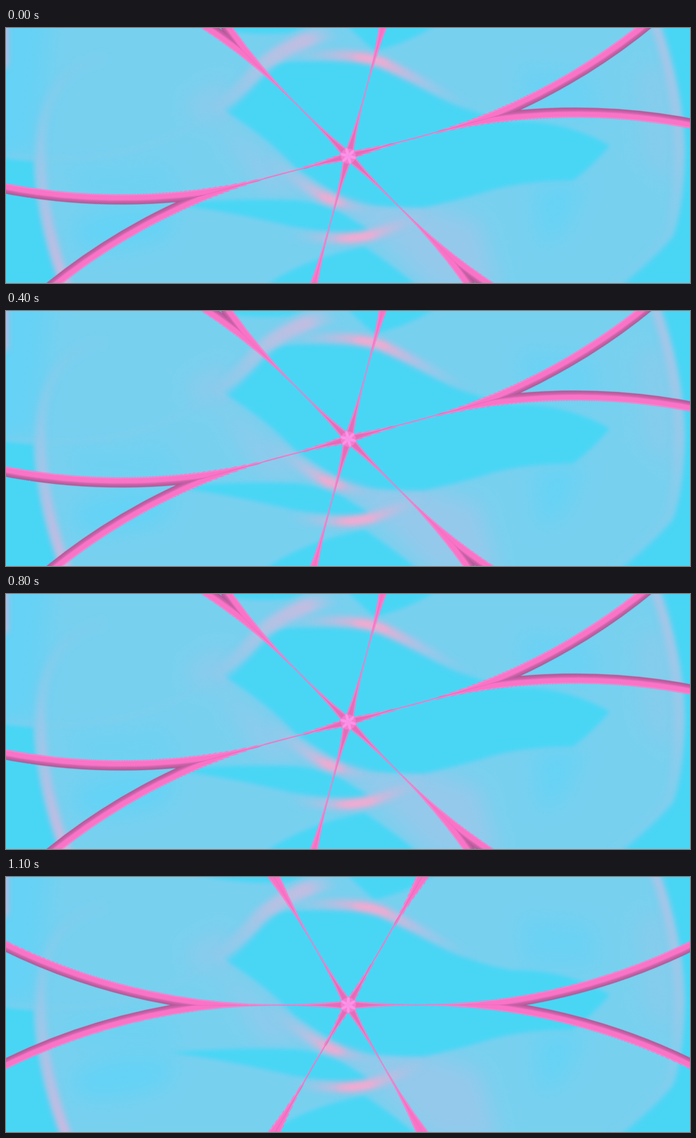
An HTML page without scripts for the animation above (1.2 s loop, 1040 px wide and 388 px high).

```html
<!DOCTYPE html>
<html lang="en">
<head>
<meta charset="utf-8">
<title>Turning star</title>
<style>
  html, body { margin: 0; width: 100%; height: 100%; overflow: hidden; background: #4ad6f5; }
  svg { display: block; width: 100vw; height: 100vh; }
  .spin { transform-origin: 0 0; animation: spin 400ms steps(4, end) infinite; }
  @keyframes spin {
    from { transform: rotate(-15deg); }
    to { transform: rotate(-75deg); }
  }
  .line { fill: none; }
  .cyan { fill: #4ad6f5; }
</style>
</head>
<body>
<svg viewBox="0 0 1040 388" preserveAspectRatio="none">
  <defs>
    <filter id="soft2" filterUnits="userSpaceOnUse" x="-60" y="-60" width="1160" height="510"><feGaussianBlur stdDeviation="3"/></filter>
    <filter id="soft5" filterUnits="userSpaceOnUse" x="-60" y="-60" width="1160" height="510"><feGaussianBlur stdDeviation="5"/></filter>
    <filter id="soft16" filterUnits="userSpaceOnUse" x="-60" y="-60" width="1160" height="510"><feGaussianBlur stdDeviation="16"/></filter>

    <linearGradient id="arcA" gradientUnits="userSpaceOnUse" x1="325" y1="125" x2="500" y2="2">
      <stop offset="0" stop-color="#94c9eb" stop-opacity=".5"/>
      <stop offset=".5" stop-color="#b2c2e4"/>
      <stop offset=".8" stop-color="#c2bde1"/>
      <stop offset="1" stop-color="#b8c2e4" stop-opacity="0"/>
    </linearGradient>
    <linearGradient id="arcB" gradientUnits="userSpaceOnUse" x1="425" y1="0" x2="710" y2="0">
      <stop offset="0" stop-color="#a8c6e8" stop-opacity="0"/>
      <stop offset=".42" stop-color="#f4a9d0"/>
      <stop offset=".55" stop-color="#e2b0d6"/>
      <stop offset=".75" stop-color="#a8c4e8" stop-opacity=".8"/>
      <stop offset="1" stop-color="#8ccbec" stop-opacity="0"/>
    </linearGradient>
    <linearGradient id="arcC" gradientUnits="userSpaceOnUse" x1="395" y1="0" x2="560" y2="0">
      <stop offset="0" stop-color="#98c8ea" stop-opacity="0"/>
      <stop offset=".4" stop-color="#b8c0e2"/>
      <stop offset=".6" stop-color="#f2a9d0"/>
      <stop offset="1" stop-color="#a0c8ea" stop-opacity="0"/>
    </linearGradient>
    <linearGradient id="arcD" gradientUnits="userSpaceOnUse" x1="430" y1="0" x2="640" y2="0">
      <stop offset="0" stop-color="#a0c8ea" stop-opacity="0"/>
      <stop offset=".45" stop-color="#f6a9d0"/>
      <stop offset=".6" stop-color="#eaaed4"/>
      <stop offset="1" stop-color="#a0c8ea" stop-opacity="0"/>
    </linearGradient>
    <linearGradient id="rimL" x1="0" y1="0" x2="0" y2="1">
      <stop offset="0" stop-color="#86ccec" stop-opacity=".2"/>
      <stop offset=".45" stop-color="#9ac8ea"/>
      <stop offset="1" stop-color="#d2b6de"/>
    </linearGradient>
    <linearGradient id="rimR" x1="0" y1="0" x2="0" y2="1">
      <stop offset="0" stop-color="#acc4e6"/>
      <stop offset=".5" stop-color="#98c9ea"/>
      <stop offset="1" stop-color="#7ccfef" stop-opacity=".3"/>
    </linearGradient>
    <linearGradient id="pink" gradientUnits="userSpaceOnUse" x1="0" y1="0" x2="120" y2="0">
      <stop offset=".1" stop-color="#e66cb9"/>
      <stop offset="1" stop-color="#f973c6"/>
    </linearGradient>

    <!-- half of one arm: a ring nearly touching the x axis -->
    <path id="edge" d="M0-6.3A940 940 0 0 0 585-132.2"/>
    <clipPath id="half"><path d="M0-6.3A940 940 0 0 0 585-132.2V.4H0Z"/></clipPath>
    <g id="branch" clip-path="url(#half)" class="line">
      <use href="#edge" stroke="#b35a97" stroke-width="30"/>
      <use href="#edge" stroke="#c460a5" stroke-width="26"/>
      <use href="#edge" stroke="#da68b3" stroke-width="21"/>
      <use href="#edge" stroke="url(#pink)" stroke-width="17.5"/>
      <use href="#edge" stroke="#ff86d3" stroke-width="2.4"/>
    </g>
    <g id="arm">
      <use href="#branch"/>
      <use href="#branch" transform="scale(1 -1)"/>
    </g>
    <g id="trio">
      <use href="#arm"/>
      <use href="#arm" transform="rotate(60)"/>
      <use href="#arm" transform="rotate(120)"/>
    </g>
    <g id="petals" fill="#fb93e6">
      <ellipse cx="6.5" rx="6" ry="2.3"/>
      <ellipse cx="6.5" rx="6" ry="2.3" transform="rotate(60)"/>
      <ellipse cx="6.5" rx="6" ry="2.3" transform="rotate(120)"/>
    </g>
  </defs>

  <rect width="1040" height="388" fill="#78d0ef"/>

  <!-- broad tints -->
  <g filter="url(#soft16)">
    <path d="M-40-40H70L50 190L-40 200Z" fill="#66d2f5"/>
    <path d="M100 300Q170 260 260 280L240 320Q160 345 110 335Z" fill="#64d3f6"/>
    <path d="M90 205Q180 215 240 200L270 260H110Z" fill="#6ed1f2"/>
    <path d="M780 60L890 70L900 135H790Z" fill="#6bd2f4"/>
    <path d="M805 240L880 235L850 310L810 330Z" fill="#66d3f5"/>
    <path d="M275 110L330 80L350 130L290 145Z" fill="#8ccbec"/>
    <path d="M320 140L470 250L390 250Z" fill="#90caec"/>
    <path d="M500 262H620L720 295L750 400H650L570 320Z" fill="#94c9eb"/>
    <path d="M960 60L1010 60L1020 240L970 200Z" fill="#86ccec"/>
  </g>

  <!-- clear openings -->
  <g class="cyan" filter="url(#soft2)">
    <path d="M398 54Q470 48 530 51Q580 58 640 94Q700 130 770 142Q850 140 918 179Q890 212 862 232Q780 232 720 252Q670 266 636 273Q570 274 520 264Q470 232 440 212Q400 168 330 124Q376 92 398 54Z"/>
    <path d="M248 267Q350 259 440 262Q490 268 516 285L552 307Q535 313 520 313Q460 309 400 294Q320 276 248 267Z"/>
    <path d="M395 392Q455 350 545 333Q575 352 625 392Z"/>
    <path d="M518-5Q540 18 560 34Q605 26 655-5Z"/>
    <path d="M270-8Q360 14 430 7L470-8Z"/>
    <path d="M-20 195Q20 200 42 203Q46 300 88 400H-20Z"/>
    <path d="M986-10Q1030 90 1032 190Q1030 270 1014 315Q985 350 925 400H1060V-10Z"/>
  </g>
  <path d="M0 195Q160 210 250 165T330 122" class="line" stroke="#84cded" stroke-width="5" opacity=".5" filter="url(#soft2)"/>

  <!-- glowing streaks -->
  <g class="line" filter="url(#soft5)">
    <path d="M322 128Q360 92 385 62Q430 20 505 4" stroke="url(#arcA)" stroke-width="23"/>
    <path d="M425 43Q530 36 572 52Q620 75 710 124" stroke="url(#arcB)" stroke-width="15"/>
    <path d="M395 195Q470 255 495 261Q520 270 560 274" stroke="url(#arcC)" stroke-width="17"/>
    <path d="M430 314Q520 326 560 314Q590 304 640 282" stroke="url(#arcD)" stroke-width="15"/>
    <path d="M-4-10V60" stroke="#f3a9cf" stroke-width="12" opacity=".8"/>
    <path d="M94 400Q53 290 53 190Q53 65 150 45" stroke="url(#rimL)" stroke-width="15"/>
    <path d="M986-10Q1022 90 1023 190Q1022 270 1007 315Q982 348 925 395" stroke="url(#rimR)" stroke-width="14"/>
  </g>
  <g class="line" filter="url(#soft2)" stroke="#f8a9d0" stroke-width="6" opacity=".6">
    <path d="M530 45Q558 45 580 55"/>
    <path d="M478 255Q495 264 512 267"/>
    <path d="M505 321Q535 321 558 314"/>
  </g>

  <g transform="translate(520.5 194.8)">
    <g class="spin">
      <use href="#trio"/>
      <use href="#trio" transform="rotate(180)"/>
      <circle r="11.5" fill="#f27bcf"/>
      <use href="#petals" transform="rotate(30)"/>
      <use href="#petals" transform="rotate(210)"/>
      <circle r="3.5" fill="#fa8fe6"/>
    </g>
  </g>
</svg>
</body>
</html>
```
